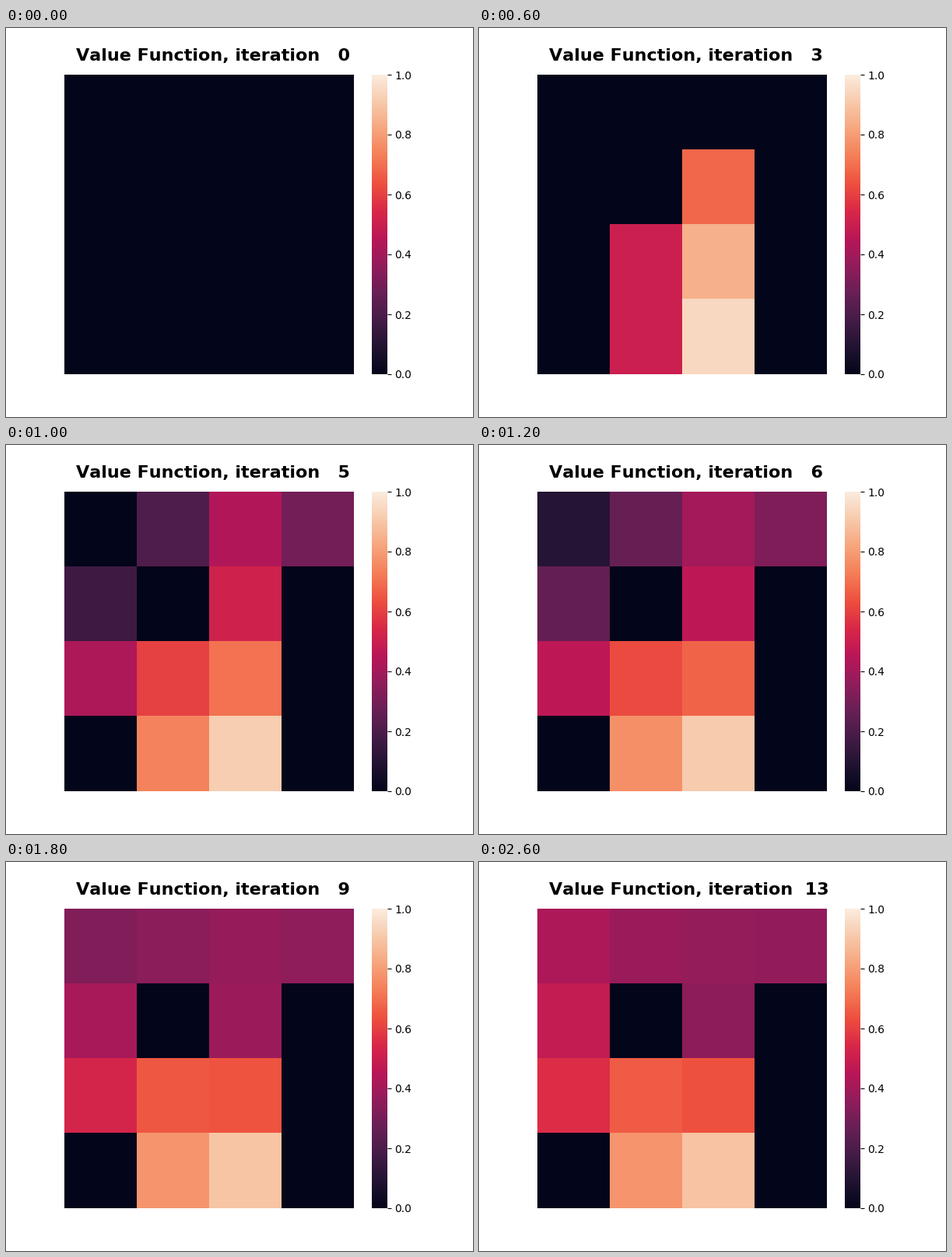
A matplotlib script that plays this animation: 600 px wide and 500 px high, repeating every 2800 ms.

```python
import numpy as np
import matplotlib.pyplot as plt
from matplotlib.animation import FuncAnimation
from matplotlib.colors import LinearSegmentedColormap

FRAMES = 14
INTERVAL = 200
SIZE = 4

# Evenly spaced stops from dark to light
CMAP = LinearSegmentedColormap.from_list("values", [
    "#03051A", "#221331", "#451C47", "#691F55", "#921C5B", "#B91657",
    "#D92847", "#ED503E", "#F47D57", "#F6A47C", "#F7C9AA", "#FAEBDD"])

# (row, column): iteration it wakes, first value, settled value, pace
CELLS = {
    (0, 0): (6, 0.10, 0.46, 3),
    (0, 1): (5, 0.21, 0.395, 3),
    (0, 2): (4, 0.50, 0.37, 1.5),
    (0, 3): (4, 0.25, 0.365, 2),
    (1, 0): (5, 0.165, 0.505, 3),
    (1, 2): (3, 0.68, 0.34, 3),
    (2, 0): (4, 0.375, 0.565, 3),
    (2, 1): (3, 0.50, 0.66, 2),
    (2, 2): (2, 1.00, 0.635, 1.8),
    (3, 1): (3, 0.50, 0.78, 1),
    (3, 2): (1, 1.00, 0.89, 3),
}


def value(i, wake, first, settled, pace):
    """Zero until the cell wakes, then an exponential approach."""
    if i < wake:
        return 0
    return settled + (first - settled) * np.exp((wake - i) / pace)


def grid_at(i):
    grid = np.zeros((SIZE, SIZE))
    for cell, params in CELLS.items():
        grid[cell] = value(i, *params)
    return grid


plt.rcParams["text.kerning_factor"] = 6  # whole-pixel kerning
fig, ax = plt.subplots(figsize=(6, 5), dpi=100)

# Row edges on whole pixels of the 385 px tall axes
x_edges = np.arange(SIZE + 1)
y_edges = np.floor(np.linspace(0, 385, SIZE + 1))
mesh = ax.pcolormesh(x_edges, y_edges, grid_at(0), cmap=CMAP, vmin=0, vmax=1)
ax.invert_yaxis()
ax.set_axis_off()
bar = fig.colorbar(mesh, ax=ax)
bar.outline.set_linewidth(0)
title = fig.text(0.15, 0.916, "", fontsize=16, fontweight="bold")


def draw(i):
    mesh.set_array(grid_at(i))
    title.set_text(f"Value Function, iteration {i:3d}")
    return mesh, title


anim = FuncAnimation(fig, draw, frames=FRAMES, interval=INTERVAL,
                     repeat=True, repeat_delay=0)
plt.show()
```
